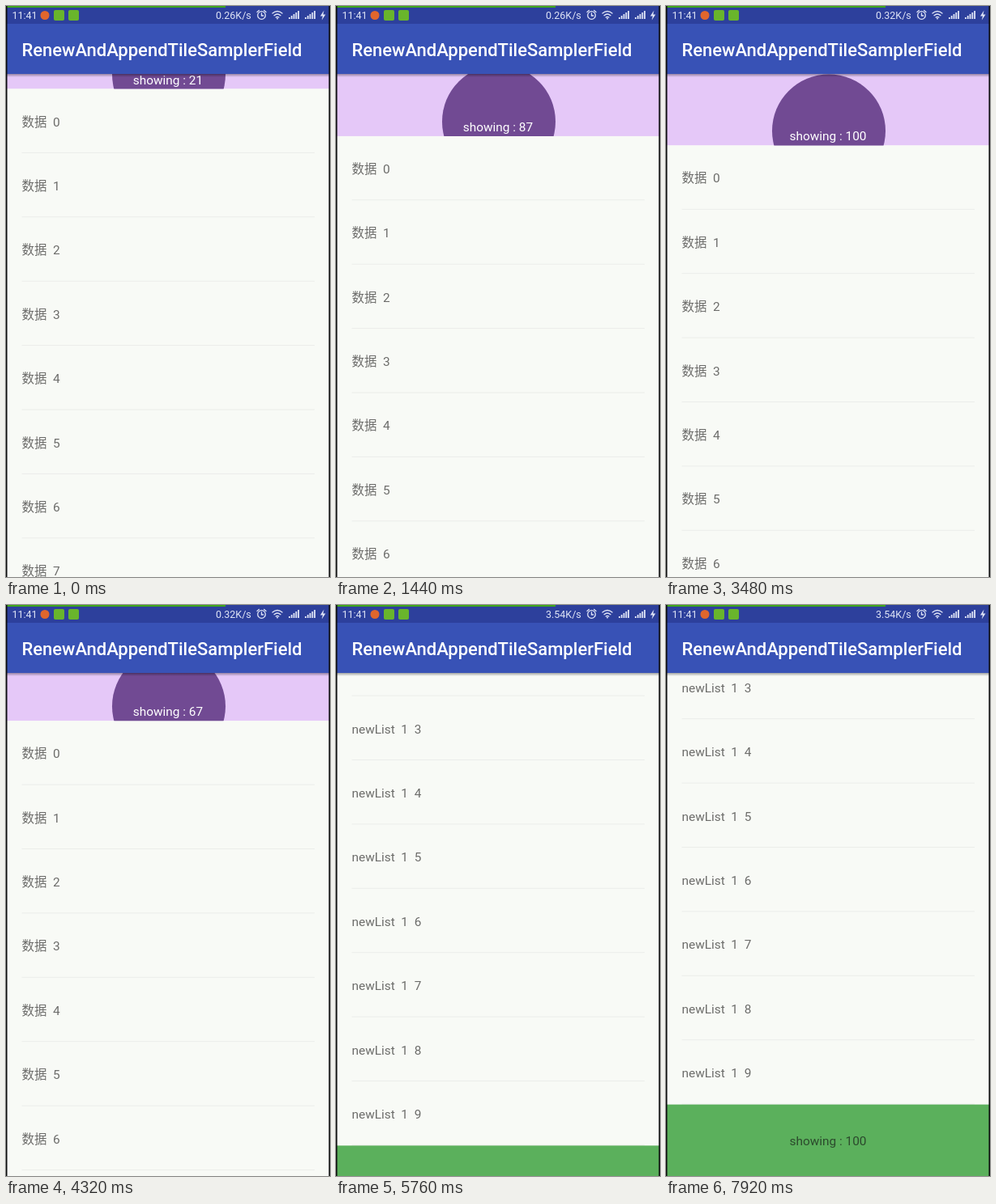
These frames come from a looping animation (400x706 px, 8000 ms). An HTML page:

```html
<!DOCTYPE html>
<html lang="zh-CN">
<head>
<meta charset="utf-8">
<title>List demo</title>
<style>
  html, body { margin: 0; width: 100%; height: 100%; overflow: hidden; background: #f8faf6; }
  svg { display: block; width: 400px; height: 706px; }
  text { font: 15.4px Roboto, "Noto Sans CJK SC", "Noto Sans CJK", sans-serif; white-space: pre; }
  #rows text { fill: #6c6c6a; }
  #rows rect { fill: #ebedea; }
  .mid { text-anchor: middle; }
  .status { font-size: 12.5px; fill: #dfe4f6; }
  .title { font-size: 22px; font-weight: 500; fill: #fff; }
  .line { fill: none; stroke: #dfe4f6; stroke-width: 1.3; stroke-linecap: round; }
</style>
</head>
<body>
<svg viewBox="0 0 400 706">
  <defs>
    <linearGradient id="shade" x2="0" y2="1">
      <stop offset="0" stop-color="#000" stop-opacity=".34"/>
      <stop offset="1" stop-color="#000" stop-opacity="0"/>
    </linearGradient>
    <clipPath id="pane"><rect y="84" width="400" height="622"/></clipPath>
    <clipPath id="banner"><rect id="bannerBox" y="-88.4" width="400" height="88.4"/></clipPath>
  </defs>
  <rect width="400" height="706" fill="#f8faf6"/>

  <g clip-path="url(#pane)">
    <g id="list">
      <g clip-path="url(#banner)">
        <rect y="-88.4" width="400" height="88.4" fill="#e5c8f8"/>
        <circle cx="201" cy="-18" r="70" fill="#714a93"/>
        <text id="topCount" class="mid" x="200" y="-6" fill="#fff"></text>
      </g>
      <g id="rows"></g>
      <g id="footer">
        <rect width="400" height="89" fill="#5bb05c"/>
        <text id="endCount" class="mid" x="200" y="50" fill="#2c4a2d"></text>
      </g>
    </g>
    <ellipse id="glow" cx="200" rx="600" fill="#3f51b5"/>
  </g>

  <rect y="84" width="400" height="4" fill="url(#shade)"/>
  <rect y="22" width="400" height="62" fill="#3852b6"/>
  <rect width="400" height="22" fill="#2d409c"/>
  <rect width="271" height="2" fill="#3fa51c"/>
  <text class="title" x="19.5" y="62">RenewAndAppendTileSamplerField</text>

  <text class="status" x="7.5" y="16">11:41</text>
  <circle cx="48" cy="11.5" r="5.5" fill="#e0662c"/>
  <rect x="59" y="5" width="13" height="13" rx="2" fill="#69b52c"/>
  <rect x="77" y="5" width="13" height="13" rx="2" fill="#69b52c"/>
  <text class="status" id="speed" x="259" y="16"></text>
  <g class="line">
    <circle cx="315.5" cy="11.5" r="4.8"/>
    <path d="M315.5 9v3h2.2M310 7.5l2.4-2M321 7.5l-2.4-2"/>
    <path d="M329 9q6-5 12 0M331 11.7q4-3.4 8 0M333.2 14q1.8-1.4 3.6 0"/>
  </g>
  <g id="signal" fill="#dfe4f6">
    <circle cx="335" cy="15.6" r="1"/>
    <path d="M392.5 5.5l-4.5 7h3l-1.2 5 4.7-7h-3z"/>
  </g>
  <path d="M.75 0v706M399.25 0v706" stroke="#0b0b0d" stroke-width="1.5"/>
</svg>
<script>
  const LOOP = 8000, STEP = 120, TOP = 84, BOTTOM = 706;
  const ROW = 79.4, PANEL = 88.4, PAGE = 10;
  const LIST_END = TOP + 2 * PAGE * ROW;

  // Each track is a list of [time, value].
  const pull = [[0, 18.5], [840, 68], [1440, 76.9], [1680, 84], [1920, PANEL],
    [4140, PANEL], [4320, 59.2], [4560, 6], [4680, 0]];
  const scroll = [[4800, 0], [4920, 60], [5160, 330], [5400, 670],
    [5640, 930], [5760, LIST_END - 668.4], [5880, LIST_END - BOTTOM + PANEL]];
  const glowSize = [[5760, 0], [5880, .3], [6120, .5], [6480, .66], [6720, .69],
    [6960, .4], [7200, .16], [7440, 0]];
  const glowAlpha = [[5760, 0], [5880, .36], [6720, .36], [7440, 0]];
  const speeds = [[0, "0.26K/s"], [2100, "0.32K/s"], [5100, "3.54K/s"]];

  const $ = id => document.getElementById(id);

  function add(parent, name, attrs, text = "") {
    const el = document.createElementNS("http://www.w3.org/2000/svg", name);
    for (const key in attrs) el.setAttribute(key, attrs[key]);
    el.textContent = text;
    $(parent).append(el);
  }

  function at(track, t) {
    const i = track.findIndex(point => point[0] > t);
    if (i === 0) return track[0][1];
    if (i < 0) return track[track.length - 1][1];
    const [t0, a] = track[i - 1], [t1, b] = track[i];
    return a + (b - a) * (t - t0) / (t1 - t0);
  }

  const move = (id, y) => $(id).setAttribute("transform", `translate(0 ${y})`);
  const label = height =>
    `showing : ${Math.round(Math.max(0, Math.min(1, height / PANEL)) * 100)}`;

  for (let i = 0; i < 2 * PAGE; i++) {
    const name = i < PAGE ? `数据  ${i}` : `newList  1  ${i - PAGE}`;
    add("rows", "text", { x: 19.5, y: i * ROW + 46 }, name);
    add("rows", "rect", { x: 19.5, y: (i + 1) * ROW - 1, width: 361.5, height: 1 });
  }
  move("footer", 2 * PAGE * ROW);

  for (const x of [349, 369])
    for (let i = 0; i < 5; i++)
      add("signal", "rect", { x: x + i * 2.8, y: 14 - i * 2, width: 1.8, height: 2 + i * 2 });

  function draw(time) {
    const t = Math.floor(time % LOOP / STEP) * STEP;
    const height = at(pull, t), offset = at(scroll, t), size = at(glowSize, t);
    move("list", TOP + height - offset);
    $("topCount").textContent = label(height);
    $("endCount").textContent = label(BOTTOM - LIST_END + offset);
    $("speed").textContent = speeds.filter(s => s[0] <= t).pop()[1];
    $("glow").setAttribute("cy", BOTTOM + 519.6 * size);
    $("glow").setAttribute("ry", 600 * size);
    $("glow").setAttribute("opacity", at(glowAlpha, t));
  }

  const start = performance.now();
  function tick() {
    draw(performance.now() - start);
    requestAnimationFrame(tick);
  }
  tick();
</script>
</body>
</html>
```
